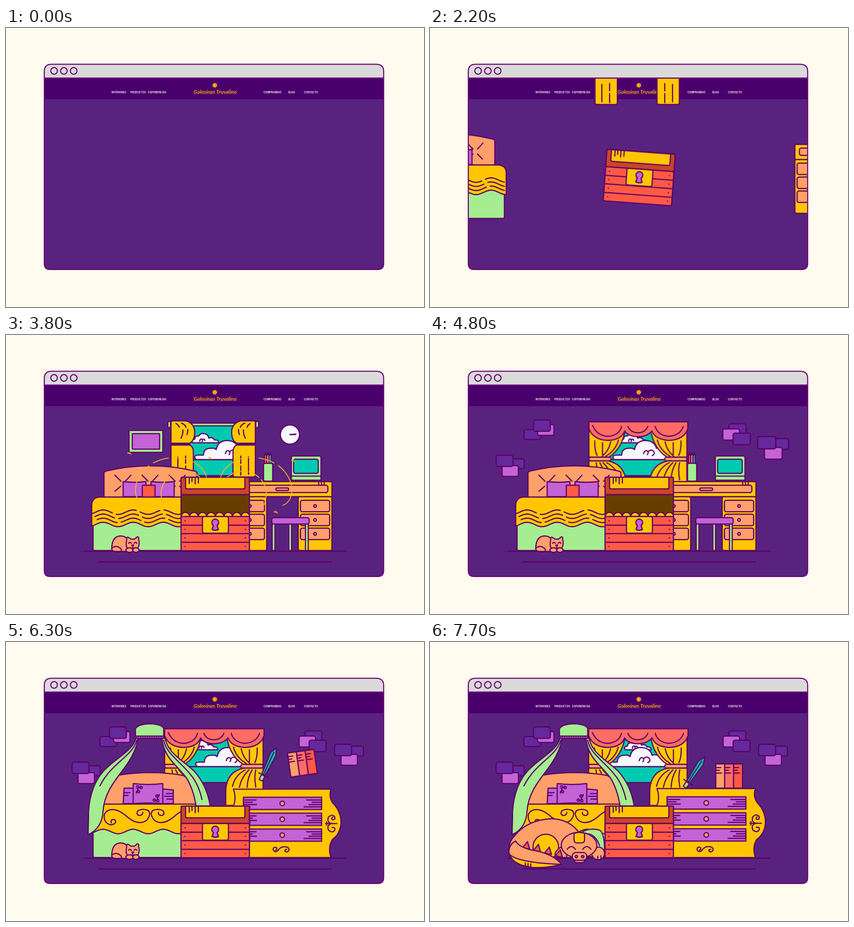
An HTML page that plays this animation: 917 px wide and 611 px high, repeating every 7800 ms.

```html
<!DOCTYPE html>
<html lang="es">
<head>
<meta charset="utf-8">
<title>Dormitorio de cuento</title>
<style>
html, body { margin: 0; width: 100%; height: 100%; overflow: hidden; background: #fffbef; }
svg { display: block; width: 100%; height: 100%; }
#scene { stroke: #5c0066; stroke-width: 2.5; stroke-linecap: round; stroke-linejoin: round; }
.nav { font: 600 5.5px Inter, sans-serif; fill: #fff; text-anchor: middle; }
.brand { font: italic 700 11.6px Lato, sans-serif; fill: #ff9f12; text-anchor: middle; }
.trail { fill: none; stroke: #ffb612; stroke-width: 1.8; stroke-dasharray: 30 5 12 4 36 100; }
</style>
</head>
<body>
<svg id="stage" viewBox="0 0 917 611"></svg>
<script>
const LOOP = 7800, STEP = 100;
const yellow = '#ffc600', peach = '#ffa06a', coral = '#ff5a45', rose = '#ff6c64', rust = '#cd4428',
  green = '#a5ed90', teal = '#00c9b0', lilac = '#c363d6', white = '#f7f7ff', violet = '#64299c', ink = '#5c0066';

// Shape helpers
const R = (x, y, w, h, r, fill) => `<rect x="${x}" y="${y}" width="${w}" height="${h}" rx="${r}" fill="${fill}"/>`;
const E = (x, y, rx, ry, fill) => `<ellipse cx="${x}" cy="${y}" rx="${rx}" ry="${ry}" fill="${fill}"/>`;
const C = (x, y, r, fill) => E(x, y, r, r, fill);
const P = (d, fill = 'none') => `<path d="${d}" fill="${fill}"/>`;
const G = (id, ...parts) => `<g id="${id}">${parts.join('')}</g>`;
const at = (x, y, body, turn = 0) => `<g transform="translate(${x} ${y}) rotate(${turn})">${body}</g>`;
const flip = (sum, body) => body + `<g transform="matrix(-1 0 0 1 ${sum} 0)">${body}</g>`;
const repeat = (n, fn) => Array.from({ length: n }, (_, i) => fn(i)).join('');
const label = (x, y, text, cls = 'nav') => `<text x="${x}" y="${y}" class="${cls}">${text}</text>`;
const wave = (from, to, y) => repeat(43, i => {
  const x = from + (to - from) * i / 42;
  return `L${x.toFixed(1)} ${(y - 5 * Math.cos((x - 279) / 66 * 2 * Math.PI)).toFixed(1)}`;
});

const header = () => R(84, 109, 745, 47, 0, '#49006c')
  + label(247.7, 142.6, 'INTERIORES') + label(290, 142.6, 'PRODUCTOS') + label(332, 142.6, 'EXPERIENCIAS')
  + label(584.5, 142.6, 'COMPROMISO') + label(626.7, 142.6, 'BLOG') + label(669, 142.6, 'CONTACTO')
  + C(458, 125.5, 5, '#ff9f12') + label(459, 143.5, 'Golosinas Truvalino', 'brand');

const pagePath = 'M84 109.6 H828.5 V516 Q828.5 528.8 816 528.8 H96 Q84 528.8 84 516Z';
const frame = () => `<g stroke="#6b0070" stroke-width="2.3">${P(pagePath)}
  ${P('M84 109.6 V95 Q84 79.4 100 79.4 H812 Q828.5 79.4 828.5 95 V109.6Z', '#dadada')}
  ${repeat(3, i => C(105.5 + i * 21.5, 94, 7.3, 'none'))}</g>`;

// Everyday room
const clouds = () => `<g clip-path="url(#pane)">`
  + G('cloudSmall', P('M428 236 q-4 -7 5 -8 q0 -8 9 -7 q3 -6 10 -5 q10 0 12 10 q8 -4 12 4 q10 -1 9 6z', white),
    P('M444 233 q0 -6 4 -5 q4 2 1 5 m0 -4 q5 -3 6 2'))
  + G('cloudBig', P('M395 273 q-8 -9 4 -10 h12 q0 -16 18 -15 q6 -1 10 3 q4 -20 24 -20 q20 1 24 17 q14 -4 22 8 q14 3 9 17z', white),
    P('M459 260 q2 -9 8 -6 q4 3 0 8 M469 255 q7 -6 12 0 q4 6 -3 9')) + '</g>';
const view = () => G('view', R(368, 197, 176, 111, 1, teal), clouds(), P('M368 273 H544'));

const curtain = P('M362 191 q0 -3 3 -3 h30 q19 6 19 25 q0 18 -11 24 H362Z', yellow)
  + P('M362 241 H403 q8 4 8 14 V307 q0 4 -4 4 H366 q-4 0 -4 -4Z', yellow)
  + P('M362 239 H404 M373 194 q5 2 7 8 M385 193 q8 3 10 9 M388 208 q1 8 -4 18 M399 207 q0 6 -2 11 M377 267 V305 M394 265 V281 M394 287 V307');
const curtains = () => G('curtains', R(358, 193, 193, 6, 1, green),
  flip(909, R(355, 189, 6, 14, 3, green) + curtain));

const picture = () => G('picture', R(270, 209, 74, 48, 1, green), R(277, 216, 60, 34, 1, lilac));
const clock = () => G('clock', C(623, 218, 21, white), P('M623 218 H635'), G('hand', P('M623 218 H636')));

const tuft = P('M-5 -5 L-18 -18 M5 -5 L17 -18 M-5 6 L-18 17 M5 6 L16 17');
const bed = () => G('bed', P('M215 355 V303 Q215 299 219 298 Q317 275 414 298 Q419 299 419 303 V355Z', peach),
  repeat(3, i => at(257 + i * 59.5, 325, tuft)),
  P('M257 354 V321 Q282 324 307 321 V354Z M318 354 V321 Q343 324 369 321 V354Z', lilac), R(299, 329, 28, 26, 1, coral),
  R(191, 400, 249, 72, 3, green),
  P(`M188 412 V371 Q190 355 206 355 H428 Q444 357 444 372 ${wave(444, 188, 415)}Z`, yellow),
  `<g stroke-dasharray="46 9">${repeat(3, i => P('M' + wave(190 + i * 5, 440, 388 + i * 9).slice(1)))}</g>`);

const cabinet = R(641, 354, 74, 118, 4, yellow)
  + repeat(3, i => R(646, 362 + i * 30.5, 64, 25, 4, peach) + C(678, 374.5 + i * 30.5, 3, peach));
const desk = () => G('desk', flip(1213, cabinet),
  R(498, 321, 217, 33, 2, yellow), R(508, 329, 198, 16, 4, peach), R(592, 335, 28, 5.5, 2.7, peach), P('M686 322 V328 M692 322 V329 M698 322 V328'));
const stool = () => G('stool', repeat(3, i => R(584 + i * 36.5, 410, 6, 62, 1, green)), R(583, 400, 82, 14, 4, lilac));
const pencils = () => G('pencils', [coral, peach, teal].map((c, i) => P(`M${567 + i * 5} 284 V265 l2.5 -6 2.5 6 V284Z`, c)).join(''),
  R(565, 281, 20, 39, 3, green));
const computer = () => G('computer', R(626, 265, 65, 45, 3, green), R(631, 272, 54, 31, 4, teal), R(626, 309, 65, 9, 2, green));

const cat = () => G('cat', P('M262 474 H240 Q231 474 232 466 Q233 440 252 440 Q268 441 270 458 V470Z', peach),
  P('M233 466 Q242 459 252 468 Q258 476 240 475'),
  P('M265 447 q-1 -5 3 -4 l6 4 h8 l6 -5 q4 0 3 5 q3 11 -1 18 q-5 7 -13 7 q-9 0 -13 -9 q-1 -8 1 -16z', peach),
  E(271, 471, 8, 5, peach), E(285, 471, 7, 5, peach),
  P('M269 456 q3 -4 6 0 M281 456 q3 -4 6 0 M276 460 h4 l-2 3z M278 463 v2 M274 466 q4 2 8 0'));

const chest = () => G('chest',
  G('lidBack', R(384, 390, 150, 62, 0, '#693d00')),
  repeat(8, i => C(393.5 + i * 18.8, 398, 9.4, yellow)),
  G('lid', R(384, 359.5, 150, 38, 2, rust), P('M394 359.5 H524 V382 q0 3 -3 3 H397 q-3 0 -3 -3Z', yellow), P('M402 360 V373 M408 360 V369 M415 360 V374 M422 360 V372')),
  R(384, 397.5, 150, 75, 3, coral), P('M384 416.5 H534 M384 435 H534 M384 454 H534'),
  `<g stroke="none">${repeat(4, i => C(393, 407 + i * 18.7, 1.4, ink) + C(525, 407 + i * 18.7, 1.4, ink))}</g>`,
  R(431, 397.5, 57, 36.5, 4, yellow), P('M455 417 a7.5 7.5 0 1 1 8 0 l3 9 q-7 3 -14 0z', lilac));

// Storybook room
const tab = P('M-11 14 V0 Q-11 -13 0 -13 Q11 -13 11 0 V14Z', peach) + P('M-5 2 q6 -4 14 -1 M-4 7 q6 -3 13 -1')
  + R(-11, 14, 22, 10, 0, rose) + repeat(4, i => P(`M${i * 4 - 6} 15 V23`));
const palaceSide = P('M564 190 H482 Q485 245 520 268 H564Z', yellow)
  + P('M564 276 H522 Q484 284 482 325 V358 H564Z', yellow)
  + P('M499 230 Q504 252 527 266 M516 234 Q520 254 535 266 M534 236 V262 M551 232 Q552 252 546 264 M497 316 Q502 292 525 280 M512 318 Q517 295 533 280 M529 318 Q530 296 540 280 M548 318 Q544 295 548 280')
  + R(515, 268, 49, 8, 4, peach);
const palace = () => G('palace', flip(912, palaceSide),
  P('M348 190 H566 V205 Q558 230 524 231 Q494 229 487 210 Q478 222 456 223 Q434 222 427 210 Q420 230 390 231 Q357 230 348 205Z', rose),
  P('M356 198 Q366 221 390 222 Q415 220 420 200 M434 200 Q440 214 456 214 Q472 214 478 200 M494 200 Q500 220 524 222 Q550 220 556 200'),
  G('tabs', [350, 428, 482, 568].map((x, i) => at(x, 202, `<g>${tab}</g>`, i === 3 ? -15 : 0)).join('')));

const pillowCurl = P('M-6 8 q0 -6 5 -6 q4 2 1 5 q-4 1 -3 -4 q0 -8 7 -10 q5 1 2 5 q-4 1 -4 -4 M-6 -6 q3 -4 5 0 q0 4 -4 3');
const drapeLeft = P('M285 211 C278 240 238 255 212 285 C190 310 180 350 181 385 L180 422 Q211 408 213 370 C216 322 252 290 268 264 C280 246 287 228 290 211Z', green)
  + P('M287 215 C276 252 232 264 206 315');
const drapeRight = P('M342 211 C347 255 374 268 396 298 Q411 322 417 359 H448 Q440 312 412 282 C385 257 356 244 349 211Z', green)
  + P('M346 215 C352 248 388 264 412 300 Q424 318 430 345');
const blanketScroll = P('M231 396 q-2 -9 7 -7 q6 5 -2 10 q-10 4 -18 -6 q-8 -18 8 -25 q18 -5 40 15 q24 20 42 8 q12 -14 4 -22 q-12 -5 -22 0 q-6 8 2 11 q8 0 8 -7');
const canopy = () => G('canopy', P('M214 356 Q218 300 245 292 Q317 280 388 292 Q414 305 417 356Z', peach),
  P('M257 354 L259 320 H290 V354Z M335 354 V321 L367 324 V354Z', lilac),
  P('M258 330 h14 M258 336 h10 M366 332 h-14 M366 338 h-18 M366 344 h-13'),
  P('M279 354 V310 Q311 314 344 310 V354 Q311 351 279 354Z', lilac),
  at(292, 323, pillowCurl), at(330, 342, pillowCurl, 180),
  R(191, 400, 249, 72, 3, green),
  P(`M215 355 H440 ${wave(440, 188, 415)} Q207 395 215 355Z`, yellow), flip(634, blanketScroll),
  drapeLeft, drapeRight,
  P('M284 207 V190 Q290 180 315 179 Q343 180 346 190 V207Z', green), R(284, 206, 62, 5, 1, white),
  `<path d="M286 208.5 H345" stroke-width="5" stroke-linecap="butt" stroke-dasharray="2.6 1.3"/>`);

const dresser = () => G('dresser', P('M498 321 H714 Q708 338 718 352 Q736 370 736 396 Q734 420 717 432 Q706 450 714 472 H498 V359 Q505 340 498 321Z', yellow),
  repeat(3, i => at(520, 339 + i * 35, R(0, 0, 173, 27, 0, lilac) + C(86, 13.5, 5, peach)
    + P('M1 6 h27 m-27 5 h19 m-19 5 h28 m-28 5 h14 M172 6 h-32 m32 5 h-20 m20 5 h-27 m27 5 h-38'))),
  P('M593 450 q-8 -2 -7 5 q3 7 10 2 q6 -9 14 -9 q12 0 11 8 q-4 6 -9 2 q-1 -4 4 -4 M593 450 q3 5 -2 6'),
  P('M702 397 H727 M716 397 q-12 -2 -8 -14 q8 -8 14 -1 q2 8 -6 6 q-2 -4 2 -5 M716 397 q-12 2 -8 14 q8 8 14 1 q2 -8 -6 -6 M704 393 v8'));
const books = () => G('books', [peach, rose, coral].map((c, i) =>
  at(627 + i * 19.5, 267, R(0, 0, 19.5, 53, 1, c) + P('M1 8 h10 M1 14 h7 M1 20 h12'))).join(''));
const sword = () => G('sword', at(559, 318, R(-4, -12, 8, 12, 1, green) + P('M-4 -14 L-6 -65 L1 -79 L7 -63 L4 -14Z', teal)
  + P('M0 -16 V-68 M-11 -13 H11'), 33));

const dragon = () => G('dragon', P('M322 424 Q345 404 372 412 Q384 418 383 470 H340Z', green), P('M340 420 Q362 418 372 446'),
  P('M330 422 Q308 387 264 387 Q212 391 186 424 Q171 440 173 460 L290 474Z', peach),
  C(254, 449, 28, yellow),
  P('M300 472 H277 q-6 -8 2 -16 q8 -10 20 -8Z', peach),
  repeat(4, i => at(212 + i * 24, 446 + i * 6, P('M-8 6 L0 -9 L8 6Z', coral), 12)),
  P('M188 436 Q194 448 220 455 Q268 462 289 487 Q258 495 226 494 Q180 488 173 460 Q174 442 188 436Z', peach),
  P('M175 466 Q198 484 289 487 Q258 495 226 494 Q183 489 175 466Z', yellow), P('M209 484 V492 M215 485 V493 M221 486 V493'),
  E(369, 463, 14, 14, peach), P('M368 469 V476 M375 468 V475'),
  E(327, 445, 39, 28, peach), P('M316 419 V433 q0 7 7 7 h9 q7 0 7 -7 V419 Q328 415 316 419Z', yellow),
  P('M301 454 q9 -12 18 0 M335 454 q9 -12 18 0'),
  P('M316 470 V476 q0 7 7 7 h10 q7 0 7 -7 V470Z', peach), R(312, 461, 32, 17, 8, peach), C(321, 470, 2.6, rose), C(335, 470, 2.6, rose));

// Each cluster: one stone in front of a lilac one and a darker one
const stones = (id, x, y, lx, ly, bx, by) => G(id, R(x + bx, y + by, 37, 22, 4, violet),
  R(x + lx, y + ly, 36, 24, 4, lilac), R(x, y, 37, 25, 4, violet));
const wall = () => stones('stones0', 227, 186, 9, 10, -21, 21) + stones('stones1', 145, 263, 13, 23, 25, 8)
  + stones('stones2', 665, 215, -22, -9, -9, -20) + stones('stones3', 721, 224, 14, 22, 26, 4);

const trail = d => `<path class="trail" pathLength="100" d="${d}"/>`;
const spark = (x, y) => at(x, y, P('M-5 -3 q7 -1 9 6 q-4 -4 -9 -3z', '#ffb612'));
const magic = () => flip(911, trail('M440 311 C425 268 365 255 318 283 C270 315 278 372 310 374 Q330 374 334 358')
  + trail('M425 311 C395 285 345 300 340 345 Q340 372 355 390'))
  + G('sparks', `<g stroke="none">${spark(276, 261)}${spark(449, 271)}${spark(590, 387)}${spark(627, 277)}</g>`);

stage.innerHTML = `<defs><clipPath id="pane"><rect x="368" y="197" width="176" height="76"/></clipPath>
  <clipPath id="page"><path d="${pagePath}"/></clipPath></defs>
  ${P(pagePath, '#5a227f')}${header()}
  <g clip-path="url(#page)"><g id="scene">${G('floor', P('M171 473.5 H747 M204 497 H714'))}
  ${wall()}${view()}${curtains()}${palace()}${picture()}${clock()}${bed()}${canopy()}${pencils()}${computer()}${sword()}${books()}
  ${desk()}${stool()}${dresser()}${chest()}${cat()}${dragon()}${magic()}</g></g>${frame()}`;

// Motion: every pose holds for one step
function play(el, poseAt) {
  const frames = [];
  for (let t = 0; t <= LOOP; t += STEP) frames.push({ offset: t / LOOP, easing: 'step-end', ...poseAt(t) });
  el.animate(frames, { duration: LOOP, iterations: Infinity });
}
const byId = id => document.getElementById(id);
const clamp = v => Math.min(1, Math.max(0, v));
const fall = (t, start, end) => (1 + Math.cos(Math.PI * clamp((t - start) / (end - start)))) / 2;
const sway = (t, amp, peak, period, end) =>
  amp * Math.cos((t - peak) / period * 2 * Math.PI) * clamp((end - t) / 600);

function move(id, [ox, oy], start, end, poseAt) {
  play(byId(id), t => {
    const { x = 0, y = 0, r = 0, s = 1 } = poseAt(t);
    return { opacity: t >= start && t < end ? 1 : 0,
      transform: `translate(${x + ox}px,${y + oy}px) rotate(${r}deg) scale(${s}) translate(${-ox}px,${-oy}px)` };
  });
}
// Eases from an offset to the resting place
const glide = (id, start, stop, x, y, end = Infinity, r = 0, origin = [0, 0]) => move(id, origin, start, end, t => {
  const k = fall(t, start, stop);
  return { x: x * k, y: y * k, r: r * k };
});
// Springs up from a small size
const spring = u => 1 - .55 * Math.exp(-u / 110) * Math.cos(u / 75);
const pop = (id, origin, start, end = Infinity, extra = () => ({})) =>
  move(id, origin, start, end, t => ({ s: spring(Math.max(0, t - start)), ...extra(t) }));

move('chest', [459, 416], 200, Infinity, t => {
  const drop = fall(t, 200, 700), hop = Math.sin(Math.PI * clamp((t - 700) / 900));
  return { x: 100 * drop, y: -247 * drop - 65 * hop - 118 * fall(t, 1700, 3200), r: sway(t, 4.2, 2200, 1300, 3300) };
});
for (const id of ['lid', 'lidBack'])
  move(id, [0, 0], 0, Infinity, t => ({ y: -48 * (fall(t, 4900, 5200) - fall(t, 3400, 3700)) }));

glide('bed', 1800, 2800, -423, -84, 5000);
glide('desk', 1800, 2800, 462, -101, 5900);
glide('stool', 1800, 2800, 462, -101, 5900);
glide('curtains', 1800, 3100, 0, -183, 4300);
glide('floor', 2400, 2800, 0, 55);
glide('view', 2400, 3000, 0, -200);
glide('picture', 2400, 2900, 0, -150, 4300);
glide('clock', 2400, 3000, -35, -150, 4400);
glide('computer', 2300, 3000, -30, -150, 6000);
glide('pencils', 2300, 3000, 15, -150, 6000);
glide('books', 5900, 6500, -24, -112, Infinity, -32, [656, 294]);
glide('sword', 5900, 6500, 0, -60, Infinity, -32, [559, 318]);

pop('cat', [262, 474], 2500, 6400);
pop('palace', [456, 200], 4300);
pop('canopy', [315, 472], 5000, Infinity, t => {
  const r = sway(t, 4, 5500, 700, 6200);
  return { r, x: -2.5 * r };
});
pop('dresser', [610, 472], 5900);
pop('dragon', [280, 485], 6400);
const corners = [[245, 205], [175, 285], [672, 218], [752, 245]];
corners.forEach((origin, i) => pop('stones' + i, origin, 4300 + i * 100));

byId('tabs').querySelectorAll('g > g').forEach(el => play(el, t => {
  const c = Math.cos((t - 5500) / 255) * Math.exp((4300 - t) / 2500);
  return { transform: `translate(${-5 * c}px,0px) rotate(${10 * c}deg)` };
}));
play(byId('hand'), t => ({ transform: `translate(623px,218px) rotate(${90 + (t - 2900) * .296}deg) translate(-623px,-218px)` }));

const drift = t => 13 * (1 - Math.cos((t - 2900) / 2400 * 2 * Math.PI));
play(byId('cloudBig'), t => ({ transform: `translate(${drift(t)}px,0px)` }));
play(byId('cloudSmall'), t => ({ transform: `translate(${-.85 * drift(t)}px,0px)` }));

const glowing = t => t > 3400 && t < 4300 ? 1 : 0;
document.querySelectorAll('.trail').forEach(el =>
  play(el, t => ({ strokeDashoffset: (3800 - t) * .22, opacity: glowing(t) })));
pop('sparks', [456, 311], 3500, 4200);
</script>
</body>
</html>
```
